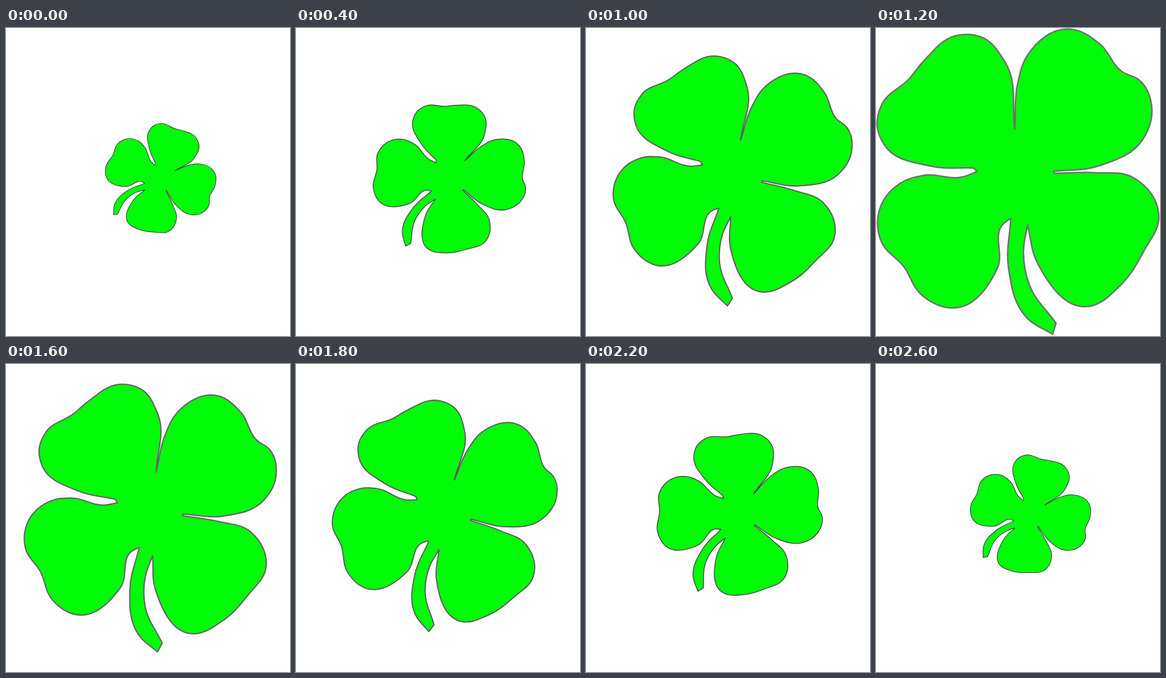
An HTML page that plays this animation: 489 px wide and 528 px high, repeating every 2.7 s.

```html
<!DOCTYPE html>
<html lang="en">
<head>
<meta charset="utf-8">
<title>Spinning clover</title>
<style>
  html, body { margin: 0; width: 100%; height: 100%; overflow: hidden; background: #fff; }
  svg { display: block; }
</style>
</head>
<body>
<svg width="489" height="528" viewBox="0 0 489 528">
  <path id="clover" fill="#00fb08" stroke-width="2.6" stroke-linejoin="round"/>
</svg>
<script>
const clover = document.getElementById('clover');

// Key points of each smooth edge, clockwise; edges meet in corners
const edges = {
  topRight: '239,173 244,95 260,48 335,2 385,27 424,75 453,89 475,138 460,190 385,236 306,246',
  bottomRight: '306,249 378,248 444,257 487,323 462,381 420,442 368,477 278,403 261,338',
  stemRight: '261,338 254,380 264,440 310,506',
  stemLeft: '304,525 262,499 228,410 232,327',
  bottomLeft: '231,327 220,335 209,412 131,480 80,459 47,408 9,366 4,320 42,266 80,253 150,255 174,246',
  topLeft: '168,240 95,237 14,200 2,168 9,133 58,86 80,59 143,12 180,15 222,58 239,173'
};

// Curve through the points; the nearer neighbour weighs more in each tangent
function smoothEdge(text) {
  const pts = text.split(' ').map(p => p.split(',').map(Number));
  const step = i => pts[i] && pts[i + 1]
    ? [pts[i + 1][0] - pts[i][0], pts[i + 1][1] - pts[i][1]]
    : [0, 0];
  const handle = (i, length) => {
    const [a, b] = [step(i - 1), step(i)].map(([x, y]) => {
      const weight = 1 / (x * x + y * y || 1);
      return [x * weight, y * weight];
    });
    const tx = a[0] + b[0], ty = a[1] + b[1];
    const k = length / Math.hypot(tx, ty);
    return [pts[i][0] + tx * k, pts[i][1] + ty * k];
  };
  const curves = pts.slice(1).map((p, i) => {
    const reach = 0.36 * Math.hypot(...step(i));
    return `C${handle(i, reach)} ${handle(i + 1, -reach)} ${p}`;
  });
  return `L${pts[0]}${curves.join('')}`;
}

// Turns 5 degrees per step, rests upright, then turns back
function angleAt(step) {
  if (step < 12) return 65 - 5 * step;
  return step < 16 ? 0 : 5 * step - 70;
}

function draw(time) {
  const angle = angleAt(Math.floor(time / 100) % 27);
  const scale = 1 - 0.014 * angle + 0.000064 * angle ** 2;
  const squash = 1 - 0.013 * Math.sin(angle * Math.PI / 60);
  const x = 244.5 + 0.54 * angle - 0.0044 * angle ** 2;
  const y = 264 - 0.049 * angle;
  clover.setAttribute('transform',
    `translate(${x} ${y}) scale(1 ${squash}) rotate(${angle}) scale(${scale}) translate(-244.5 -264)`);
  clover.setAttribute('stroke', `hsl(300, ${angle / 2}%, ${44 - 0.4 * angle}%)`);
}

const outline = Object.values(edges).map(smoothEdge).join('');
clover.setAttribute('d', `M${outline.slice(1)}Z`);

const start = performance.now();
function tick() {
  draw(performance.now() - start);
  requestAnimationFrame(tick);
}
tick();
</script>
</body>
</html>
```
